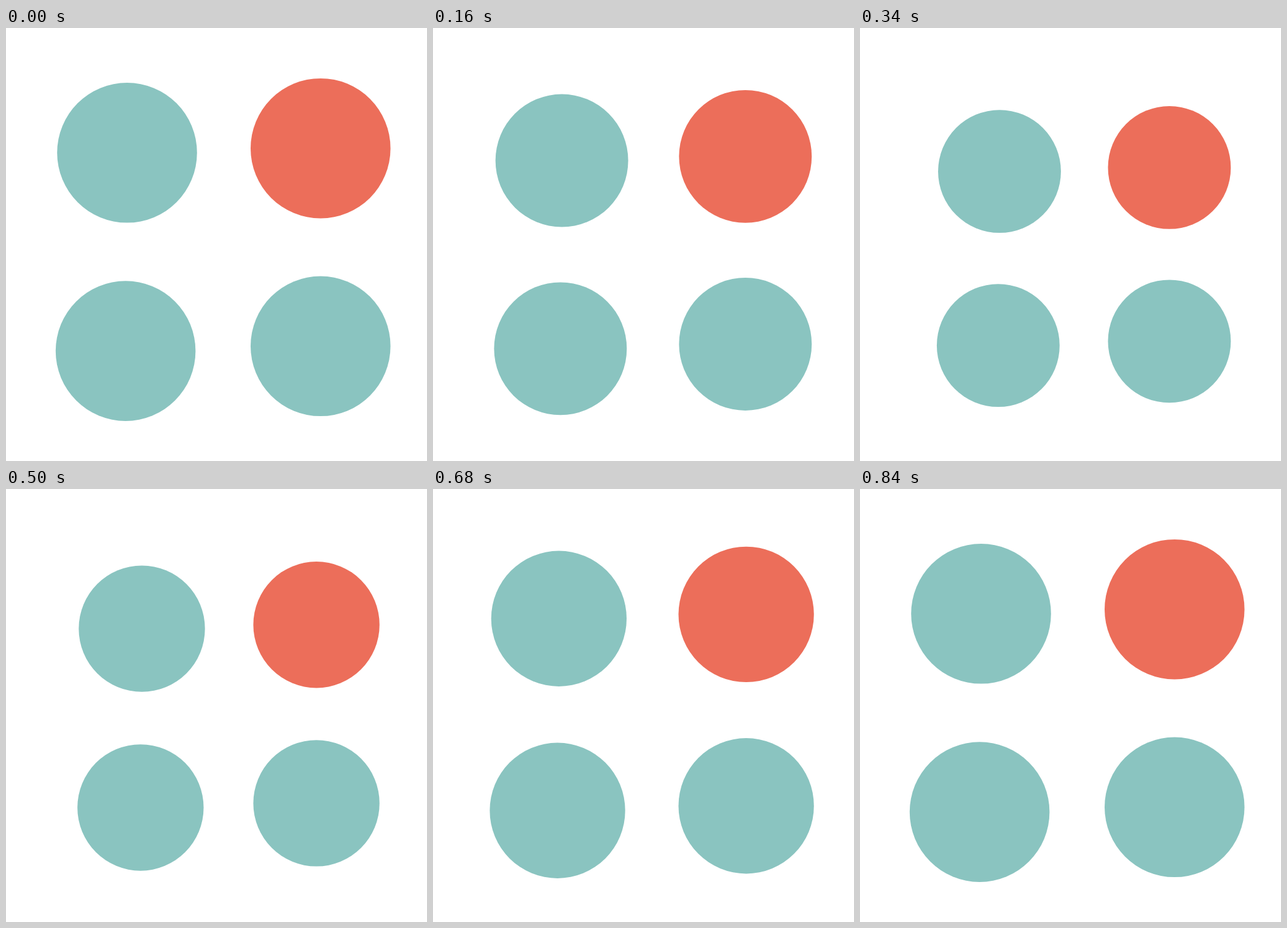
Animation, 685 px wide and 704 px high, one loop 2.98 s. Source, as an HTML page with a canvas:

```html
<!DOCTYPE html>
<html lang="en">
<head>
<meta charset="utf-8">
<title>Four dots</title>
<style>
  html, body { margin: 0; width: 100%; height: 100%; overflow: hidden; background: #fff; }
  canvas { display: block; }
</style>
</head>
<body>
<canvas id="stage" width="685" height="704"></canvas>
<script>
const ctx = document.getElementById("stage").getContext("2d");
const LOOP = 2980, STEP = 20;
const SHRINK_END = 360, GROW_END = 840;
const DEPTH = 0.123;
const PIVOT = { x: 443, y: 452 };
const RADIUS = 113.8;
const TEAL = "#8ac4c0", CORAL = "#ec6e5a";
const dots = [
  { x: 197, y: 202.8, color: TEAL },
  { x: 511.8, y: 195.7, color: CORAL },
  { x: 194.6, y: 525.1, color: TEAL },
  { x: 511.8, y: 517.3, color: TEAL }
];

function ease(from, to, t) {
  const u = Math.min(1, Math.max(0, (t - from) / (to - from)));
  return u * u * (3 - 2 * u);
}

function scaleAt(t) {
  return 1 - DEPTH * (ease(0, SHRINK_END, t) - ease(SHRINK_END, GROW_END, t));
}

function draw(t) {
  const s = scaleAt(t);
  ctx.fillStyle = "#fff";
  ctx.fillRect(0, 0, 685, 704);
  for (const { x, y, color } of dots) {
    ctx.fillStyle = color;
    ctx.beginPath();
    ctx.arc(PIVOT.x + (x - PIVOT.x) * s, PIVOT.y + (y - PIVOT.y) * s, RADIUS * s, 0, Math.PI * 2);
    ctx.fill();
  }
}

const start = performance.now();
function tick() {
  const t = (performance.now() - start) % LOOP;
  draw(Math.floor(t / STEP) * STEP);
  requestAnimationFrame(tick);
}
tick();
</script>
</body>
</html>
```
